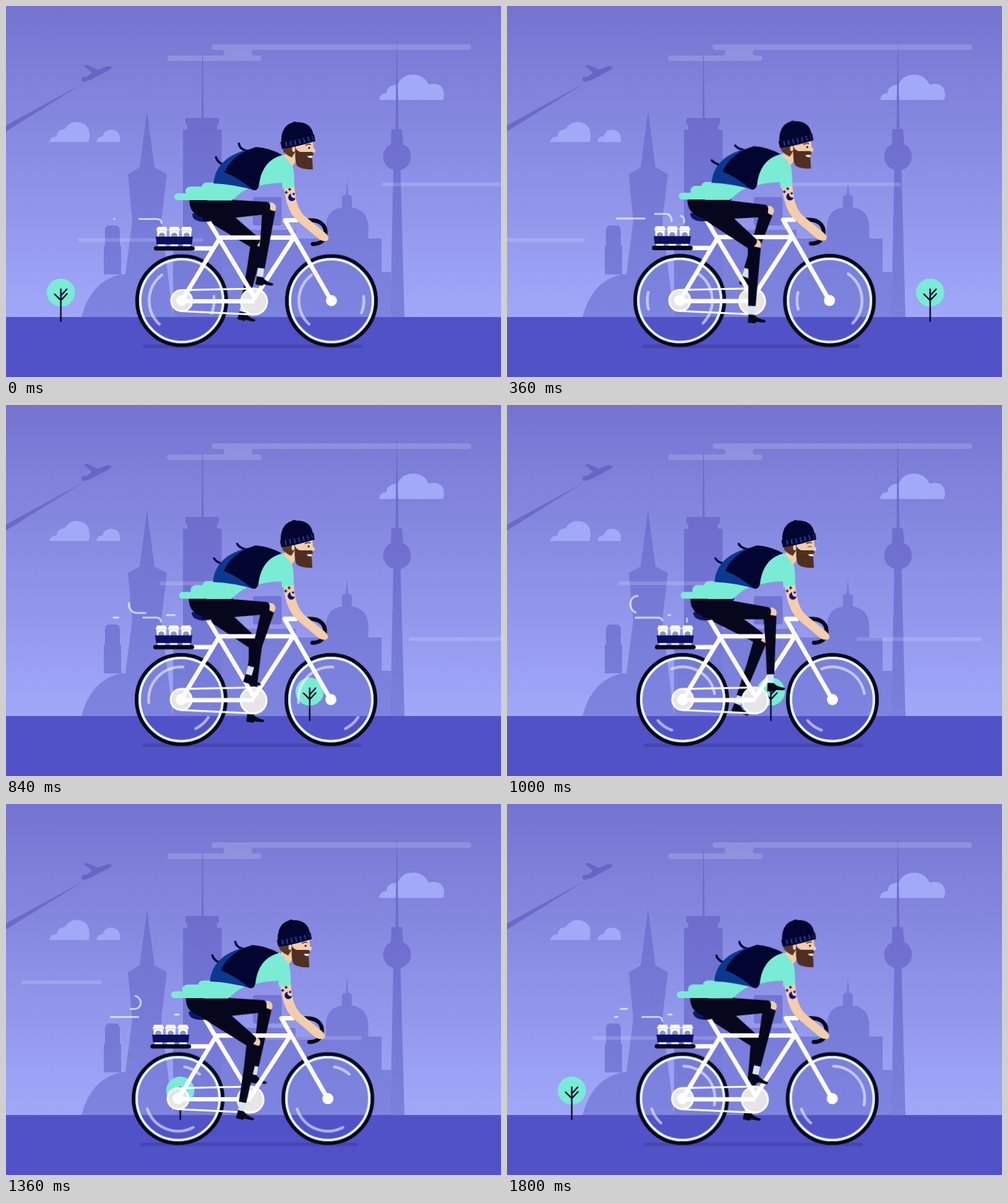
An HTML page without scripts that plays this animation: 800 px wide and 600 px high, repeating every 1.84 s.

```html
<!DOCTYPE html>
<html lang="en">
<head>
<meta charset="utf-8">
<title>Coffee courier</title>
<style>
html, body { margin: 0; width: 100%; height: 100%; overflow: hidden; background: #5252c8; }
svg { display: block; width: 100vw; height: 100vh; }
:root { --sine: cubic-bezier(.37, 0, .63, 1); --ink: #06061c; --navy: #02052f; --mint: #7aebd5; --skin: #f4cdab; }

.tree { animation: tree 1.84s linear infinite; }
@keyframes tree { to { transform: translateX(-740px); } }
.gust { animation: gust 1.84s linear infinite; }
@keyframes gust { from { x: 608px; width: 203px; } to { x: -180px; width: 104px; } }
.breeze { animation: breeze 1.84s linear infinite; }
@keyframes breeze { to { transform: translateX(-983px); } }

.sway { animation: sway .46s var(--sine) -.88s infinite alternate; }
@keyframes sway { to { transform: translateX(-6.1px); } }
.shadow { animation: shadow .46s var(--sine) -.88s infinite alternate; }
@keyframes shadow { from { x: 221px; width: 355px; } to { x: 217px; width: 351px; } }
.bob { transform-origin: 400px 551px; animation: bob .23s var(--sine) infinite alternate; }
@keyframes bob { to { transform: scaleY(1.011); } }

.spin { animation: spin 1.84s linear infinite; }
@keyframes spin { to { transform: rotate(878deg); } }

.flap { animation: flap .115s var(--sine) infinite alternate; }
@keyframes flap { to { transform: translateX(var(--by)); } }
.strap1 { animation: strap1 .23s var(--sine) infinite alternate; }
@keyframes strap1 {
  from { d: path("M396 235Q378 234 376.500 222.500"); }
  to { d: path("M396 235Q382 235 369 234"); }
}
.strap2 { animation: strap2 .23s var(--sine) infinite alternate; }
@keyframes strap2 {
  from { d: path("M366 259Q343 258 339.500 244.500"); }
  to { d: path("M366 260Q345 263 330 261"); }
}
.open { animation: open 1.84s step-end infinite; }
@keyframes open { 52% { opacity: 0; } 59% { opacity: 1; } }
.shut { animation: shut 1.84s step-end infinite; opacity: 0; }
@keyframes shut { 52% { opacity: 1; } 59% { opacity: 0; } }

.thigh { animation: thigh .92s linear infinite; }
.shank { animation: shank .92s linear infinite; }
.far .thigh, .far .shank { animation-delay: -.46s; }
@keyframes thigh {
  0%, 100% { transform: rotate(-.8deg); }
  8.33% { transform: rotate(5.6deg); }
  16.67% { transform: rotate(12.5deg); }
  25% { transform: rotate(27.2deg); }
  33.33% { transform: rotate(37.6deg); }
  41.67% { transform: rotate(39.2deg); }
  50% { transform: rotate(37deg); }
  58.33% { transform: rotate(32.7deg); }
  66.67% { transform: rotate(26.7deg); }
  75% { transform: rotate(18.8deg); }
  83.33% { transform: rotate(8deg); }
  91.67% { transform: rotate(.6deg); }
}
@keyframes shank {
  0%, 100% { transform: rotate(98.3deg); }
  8.33% { transform: rotate(83.7deg); }
  16.67% { transform: rotate(73.3deg); }
  25% { transform: rotate(55.6deg); }
  33.33% { transform: rotate(49deg); }
  41.67% { transform: rotate(55deg); }
  50% { transform: rotate(64.9deg); }
  58.33% { transform: rotate(76.6deg); }
  66.67% { transform: rotate(87.9deg); }
  75% { transform: rotate(98deg); }
  83.33% { transform: rotate(105.7deg); }
  91.67% { transform: rotate(105.5deg); }
}

.steam path { stroke-dasharray: var(--dash); animation: steam 1.84s linear infinite; }
@keyframes steam { from { stroke-dashoffset: var(--a); } to { stroke-dashoffset: var(--b); } }
</style>
</head>
<body>
<svg viewBox="0 0 800 600" preserveAspectRatio="none">
<defs>
  <linearGradient id="sky" x2="0" y2="1"><stop stop-color="#7474d0"/><stop offset="1" stop-color="#a1a8f9"/></linearGradient>
  <linearGradient id="dark" gradientUnits="userSpaceOnUse" x1="0" y1="60" x2="0" y2="503">
    <stop stop-color="#6868c6"/><stop offset=".4" stop-color="#6f70d0"/><stop offset="1" stop-color="#7a80dc"/>
  </linearGradient>
  <linearGradient id="pale" gradientUnits="userSpaceOnUse" x1="0" y1="170" x2="0" y2="503">
    <stop stop-color="#7071cf"/><stop offset="1" stop-color="#7d84df"/>
  </linearGradient>
  <g id="tree">
    <circle cx="89" cy="463.500" r="22.800" fill="#7aebd5"/>
    <path d="M89 458V510M79 466L89 476L99 465.500M89 468.500L98.500 458" fill="none" stroke="#06061c" stroke-width="2.400" stroke-linecap="round"/>
  </g>
  <g id="wheel" fill="none">
    <circle r="72" stroke="#06061c" stroke-width="6"/>
    <circle r="67" stroke="#e6faf5" stroke-width="4"/>
  </g>
  <g id="glare" fill="none" stroke="#fff" stroke-opacity=".55" stroke-width="4.500" stroke-linecap="round">
    <circle r="52.500" pathLength="360" stroke-dasharray="99 261" transform="rotate(133)"/>
    <circle r="52.500" pathLength="360" stroke-dasharray="30 330" transform="rotate(-8)"/>
  </g>
  <path id="thigh" d="M-10-13H36L92-9Q98-8 97 1Q97 9 90 11L20 18L-12 20Z" fill="#06061c"/>
  <g id="shank">
    <circle cx="0" cy="-3" r="8.500" fill="#f4cdab"/>
    <rect x="95" y="-5" width="18" height="10" fill="#d3e4f5"/>
    <path d="M5-11L99-6V6L45 7.500L-2 10.500Q-7 4 3 1Z" fill="#06061c"/>
    <path d="M-5 1H5Q11 7 23 8Q25 11 20 12H8L7 14.500H-5Z" transform="translate(112) rotate(-87)" fill="#06061c"/>
  </g>
  <g id="cup">
    <path d="M-8 362H8L6 389H-6Z" fill="#fff"/>
    <circle cy="371.500" r="5" fill="#8d93b5"/>
    <path d="M-7 357H7L8 360.500H9V363H-9V360.500H-8Z" fill="#fff"/>
    <path d="M-8.500 363.500H8.500" stroke="#c9cdea"/>
  </g>
</defs>

<rect width="800" height="504" fill="url(#sky)"/>

<!-- clouds and plane -->
<path d="M336.500 62H747.500a4.500 4.500 0 0 1 0 9H402q-5 0-5 4.500t5 4.500H408.500a4.500 4.500 0 0 1 0 9H265a4.500 4.500 0 0 1 0-9H348q5 0 5-4.500t-5-4.500H336.500a4.500 4.500 0 0 1 0-9Z" fill="#fff" fill-opacity=".16"/>
<g fill="#a2a9f7">
  <path d="M70 220Q71 211 82 211Q82 200 95 199Q101 187.500 115 187.500Q135 189 135 210Q135 217 133 220Z"/>
  <path d="M146 220Q147 211 156 211Q159 200 170 200Q183 201 184 213V220Z"/>
  <path d="M603 152Q604 141 615 141Q615 128 633 127Q640 111 658 111Q675 111 683 127Q707 122 708 143Q708 149 706 152Z"/>
</g>
<path d="M0 193L125 125L0 203Z" fill="#6a6bc9"/>
<path d="M122 120L123 115L131 114L139 108L126 97L130 95L149 103L161 98Q168 96 171 99Q170 102 164 105L136 120L124 123Z" fill="#6667c5"/>

<!-- skyline -->
<g fill="url(#pale)">
  <path d="M122 503Q137 445 185 434H200V503Z"/>
  <path d="M216 261L228 170L240 261L260 272L251 348L270 503H185L193 434L204 348L197 272Z"/>
  <path d="M348 503V362H468V376H517V354Q520 328 543 326V308Q546 306 549 305L551 280L553 305Q557 306 559 308V326Q583 329 585.500 354V376H607V430H622V503Z"/>
</g>
<g fill="url(#dark)">
  <path d="M158 434V388H160V365Q160 355 166 355H178Q184 355 184 365V388H186V434Z"/>
  <path d="M316 181L317 78H318L319.500 181H344V192H341V200H348.500V503H270V378H286V200H293V192H290V181Z"/>
  <rect x="399" y="309" width="46.500" height="46" rx="4"/>
  <path d="M631.500 50L634.500 199H640L642 223H622L623 199H629.500Z"/>
  <circle cx="632" cy="243.500" r="22.500"/>
  <path d="M626 262H637.500L644 503H621Z"/>
</g>

<g fill="#fff" fill-opacity=".16">
  <rect class="gust" x="608" y="285.500" width="203" height="6" rx="3"/>
  <g class="breeze">
    <rect x="117" y="375.500" width="202" height="6" rx="3"/>
    <rect x="1100" y="375.500" width="202" height="6" rx="3"/>
  </g>
</g>

<rect y="503" width="800" height="97" fill="#5252c8"/>
<g class="tree"><use href="#tree"/><use href="#tree" x="740"/></g>
<rect class="shadow" x="221" y="547.500" width="355" height="6" rx="3" fill="#4646b3"/>

<g class="sway"><g class="bob">
  <g class="far" transform="translate(330 327)"><g class="thigh">
    <g transform="translate(95)"><use class="shank" href="#shank"/></g>
    <use href="#thigh"/>
  </g></g>

  <!-- bicycle -->
  <g transform="translate(284 476.500)"><use href="#wheel"/><use class="spin" href="#glare"/></g>
  <g transform="translate(526 476.500)"><use href="#wheel"/><use class="spin" href="#glare"/></g>
  <g fill="#e6e6e8" stroke="#fff" stroke-width="3">
    <circle cx="284" cy="476.500" r="17"/>
    <circle cx="401" cy="478" r="21"/>
    <path d="M284 459.500L401 457M284 493.500L401 499" fill="none"/>
  </g>
  <path d="M284 477.500H402M284 477L345 376M327 347L402 472L465 375M343 374.500H465M472 346.500H451L526 477M300 392H335" fill="none" stroke="#fff" stroke-width="7" stroke-linejoin="round"/>
  <g fill="#fff"><circle cx="284" cy="476.500" r="9"/><circle cx="526" cy="476.500" r="9"/></g>
  <path d="M472 346.500H493C508 346.500 516.500 355 516.500 366C516.500 379 508 385 496 385" fill="none" stroke="var(--ink)" stroke-width="6.500"/>
  <circle cx="496" cy="385" r="3.250" fill="var(--ink)"/>
  <path d="M301 336Q301 346 314 348.500Q330 351 341 344L328 332Z" fill="#0c1766"/>

  <!-- cups -->
  <use href="#cup" x="252"/><use href="#cup" x="272"/><use href="#cup" x="292"/>
  <path d="M242 373H302L300.500 385.500H243.500Z" fill="#0b1160"/>
  <path d="M242.500 392H301.500" stroke="var(--ink)" stroke-width="7" stroke-linecap="round"/>
  <g class="steam" fill="none" stroke="#fff" stroke-opacity=".65" stroke-width="3" stroke-linecap="round">
    <path d="M251.500 351Q251 344.500 244 344.500H175" style="--dash:45 40.1;--a:5.4;--b:-164.8"/>
    <path d="M271 349Q270 337 262 337H211C194 334 197 309 211 309.500C228 311 227 332 213 331.500H184" style="--dash:37 400;--a:43.5;--b:-166"/>
    <path d="M291 351V346Q290 340.500 285 340.500H261" style="--dash:16 400;--a:25;--b:-85"/>
    <path d="M291 351V346Q290 340.500 285 340.500H261" style="--dash:6 400;--a:43;--b:-34"/>
  </g>

  <!-- rider -->
  <path d="M296.500 313H368L348 346Q324 347 308 338Q296 330 296.500 313Z" fill="var(--ink)"/>
  <g transform="translate(330 327)"><g class="thigh">
    <g transform="translate(95)"><use class="shank" href="#shank"/></g>
    <use href="#thigh"/>
  </g></g>

  <path d="M449 293L466 290C468 315 472 328 482 339L516 367Q524 374 520 379Q515 382 507 378L470 347C455 331 452 312 449 293Z" fill="var(--skin)"/>
  <path d="M461 303.500A6 6 0 1 0 468 310.500A5.500 5.500 0 0 1 461 303.500Z" fill="#0b1470"/>
  <path d="M453 299V304M450.500 301.500H455.500M458.500 294V299M456 296.500H461M465 302V306M463 304H467" stroke="#0b1470" stroke-width="1.600"/>

  <g fill="var(--mint)">
    <rect class="flap" style="--by:11px" x="272" y="303" width="75" height="11" rx="5.500"/>
    <rect class="flap" style="--by:12px" x="290" y="292" width="50" height="17" rx="8"/>
    <rect class="flap" style="--by:3px" x="316" y="285.500" width="50" height="20" rx="8"/>
    <path d="M325 300Q330 286 345 286L425 243Q445 236 456 244C465 254 466 270 466 292L447 296L446 286Q425 286 405 292C385 295 376 305 365 314.500H325Z"/>
  </g>
  <path d="M450 244L452 236L470 240L468 252Q466 256 462 259Q458 250 450 244Z" fill="var(--skin)"/>

  <g fill="none" stroke="var(--navy)" stroke-width="3.600" stroke-linecap="round">
    <path class="strap1" d="M396 235Q378 234 376.500 222.500"/>
    <path class="strap2" d="M366 259Q343 258 339.500 244.500"/>
  </g>
  <path d="M398 231C362 237 338 256 335.500 287Q366 288 402 298Z" fill="#0b3990"/>
  <path d="M404 228Q428 230 447 241C424 247 412 264 409 290Q406 301 398 297Q378 279 353 269Q365 240 404 228Z" fill="var(--navy)"/>

  <path d="M463 224L496 217L497 230Q501 232 500 235Q499 237 496 237L494 250H468Z" fill="var(--skin)"/>
  <path d="M447 228L468 223V235L462 245Q453 241 448 235Z" fill="#5a3825"/>
  <ellipse cx="465" cy="231.500" rx="2.600" ry="4.500" fill="var(--skin)"/>
  <path d="M468 229Q471 236 477 236L495 236Q498 239 496 242L487 243Q488 246 495 246L496 264Q479 265 471 259Q466 252 468 229Z" fill="#4e2f20"/>
  <path d="M487 242.500H495Q494 245.500 490 245Z" fill="#fff"/>
  <path d="M484 225.500Q489 222.500 493 224" fill="none" stroke="#4e2f20" stroke-width="1.600"/>
  <circle class="open" cx="490" cy="229.500" r="1.500" fill="var(--ink)"/>
  <path class="shut" d="M486 230H493" stroke="#7b5440" stroke-width="1.300"/>
  <path d="M445 221C444 200 454 191 462 189Q466 185.500 470 188C486 187 496 196 497 210Z" fill="var(--navy)"/>
  <path d="M443.500 220Q472 217 498 207.500L500 218.500Q474 227 446 231Z" fill="var(--navy)"/>
  <path d="M452 223.500Q475 220 496 213" fill="none" stroke="#1f4bb5" stroke-width="8" stroke-dasharray="1.800 5.600"/>
</g></g>
</svg>
</body>
</html>
```
